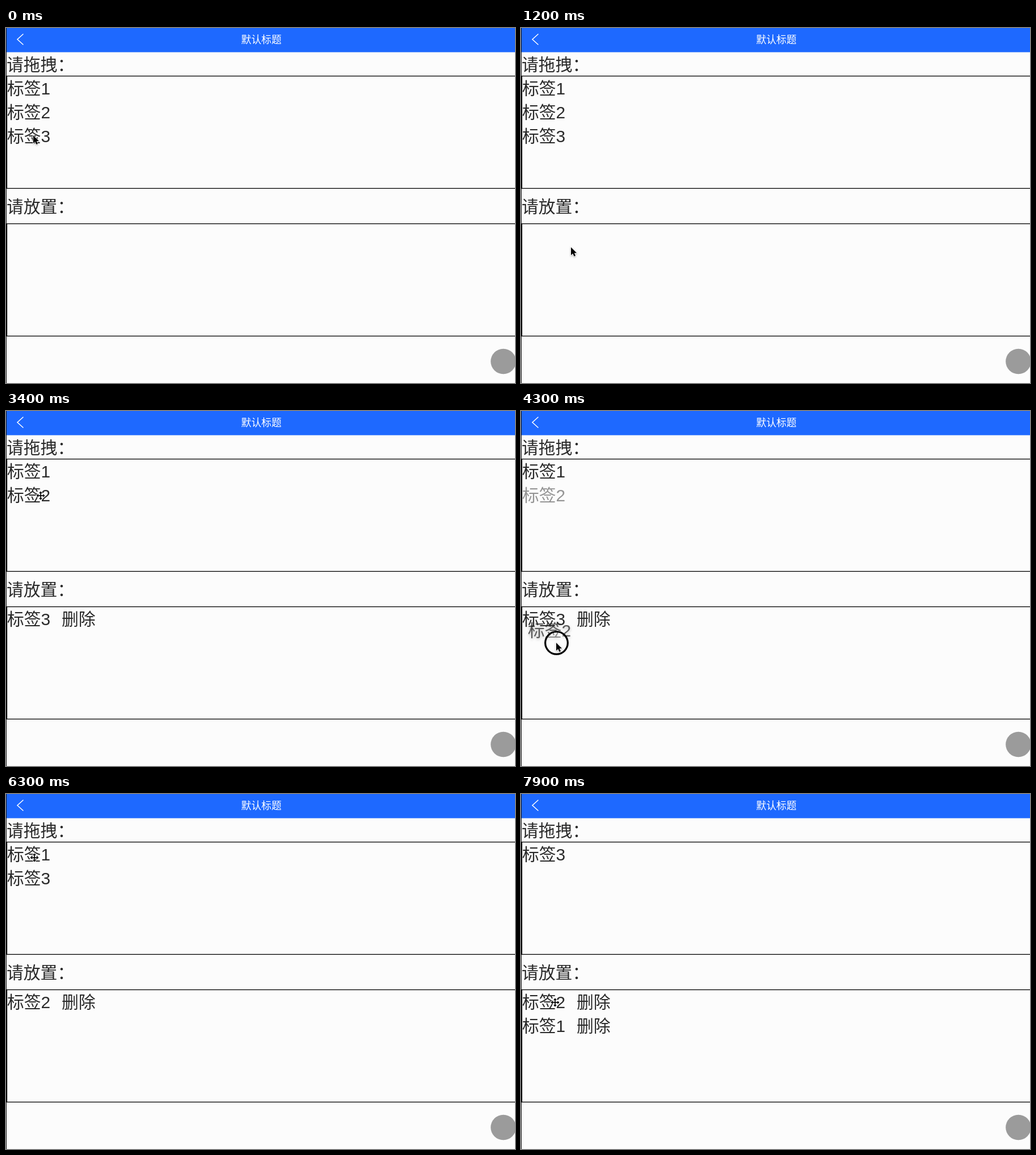
An HTML page with a canvas that plays this animation: 896x625 px, repeating every 8000 ms.

```html
<!DOCTYPE html>
<html lang="zh-CN">
<head>
<meta charset="utf-8">
<style>
html, body { margin: 0; width: 100%; height: 100%; overflow: hidden; background: #fcfcfc }
canvas { display: block }
</style>
</head>
<body>
<canvas id="stage" width="896" height="625"></canvas>
<script>
const c = document.getElementById('stage').getContext('2d');
const LOOP = 8000, STEP = 100, INK = '#2a2a2a';
const TAG = '标签';

// Pointer path: time, x, y, shape from that time on
const path = [
  [0, 48, 189, 'arrow'], [100, 49, 197, 'arrow'], [400, 66, 290, 'arrow'], [800, 85, 370, 'arrow'],
  [900, 86, 374, 'arrow'], [1000, 88, 386, 'arrow'], [1400, 88, 386, 'arrow'],
  [1900, 41, 199, 'cross'], [2100, 38, 196, 'cross'], [2200, 39, 196, 'cross'],
  [2300, 44, 226, 'arrow'], [2500, 65, 338, 'arrow'], [2800, 66, 416, 'arrow'],
  [3000, 66, 416, 'cross'], [3100, 65, 375, 'arrow'], [3400, 61, 149, 'cross'], [3800, 60, 148, 'cross'],
  [3900, 60, 165, 'arrow'], [4300, 62, 408, 'arrow'], [4500, 61, 403, 'cross'], [4700, 60, 397, 'cross'],
  [5000, 60, 397, 'cross'], [5300, 112, 368, 'text'], [5400, 118, 365, 'text'], [5700, 118, 365, 'text'],
  [5900, 116, 355, 'arrow'], [6300, 50, 112, 'cross'], [6600, 45, 109, 'cross'],
  [6700, 46, 140, 'arrow'], [6900, 53, 302, 'arrow'], [7200, 59, 425, 'arrow'],
  [7400, 60, 420, 'cross'], [7700, 60, 390, 'cross'], [7900, 60, 367, 'cross']
];

const presses = [[900, 1100], [2100, 2900], [3800, 4400], [5400, 5500], [6500, 7300]];

// Dragged tag, its row, and the offset from pointer to ghost text
const drags = [
  { from: 2300, to: 3000, tag: 3, row: 2, dx: -37, dy: -10 },
  { from: 3900, to: 4500, tag: 2, row: 1, dx: -50, dy: -11 },
  { from: 6700, to: 7400, tag: 1, row: 0, dx: -42.5, dy: -14.5 }
];

// List contents: start time, tags above, tags below
const states = [
  [0, [1, 2, 3], []], [3000, [1, 2], [3]], [4500, [1], [3, 2]],
  [5600, [1, 3], [2]], [7400, [3], [2, 1]]
];

const latest = (list, t) => list.filter(k => k[0] <= t).pop();

function pointerAt(t) {
  const a = latest(path, t), b = path[path.indexOf(a) + 1] || a;
  const u = a === b ? 0 : (t - a[0]) / (b[0] - a[0]);
  return { x: a[1] + (b[1] - a[1]) * u, y: a[2] + (b[2] - a[2]) * u, shape: a[3] };
}

function text(s, x, y, size = 29.8, color = INK) {
  c.font = `300 ${size}px "Liberation Sans", "Noto Sans CJK SC", "Noto Sans CJK", sans-serif`;
  c.fillStyle = color;
  c.fillText(s, x, y);
}

function line(points, color, width) {
  c.beginPath();
  points.forEach(p => c.lineTo(p[0], p[1]));
  c.strokeStyle = color;
  c.lineWidth = width;
  c.stroke();
}

function disc(x, y, r, fill) {
  c.beginPath();
  c.arc(x, y, r, 0, 7);
  c.fillStyle = fill;
  c.fill();
}

function drawPage() {
  c.fillStyle = '#fcfcfc';
  c.fillRect(0, 0, 896, 625);
  c.fillStyle = '#1e69ff';
  c.fillRect(0, 0, 896, 42.6);
  c.fillStyle = '#111';
  c.fillRect(0, 0, 1, 625);
  line([[30.5, 10.5], [20, 20], [30.5, 29.5]], '#fff', 1.5);
  c.textAlign = 'center';
  text('默认标题', 449.5, 27, 17.8, '#fff');
  c.textAlign = 'left';
  text('请拖拽：', 1, 74.5);
  text('请放置：', 1, 324.5);
  c.strokeStyle = '#000';
  c.lineWidth = 1.3;
  c.strokeRect(1.5, 84.6, 900, 197.8);
  c.strokeRect(1.5, 344.6, 900, 197.8);
  disc(875.5, 587, 22.3, '#9b9b9b');
}

const shapes = {
  arrow() {
    c.beginPath();
    [[0, 0], [0, 14], [3.2, 11], [5.5, 16], [8, 15], [5.8, 10.2], [10, 10]].forEach(p => c.lineTo(...p));
    c.closePath();
    c.save();
    c.shadowColor = 'rgba(0,0,0,.35)';
    c.shadowBlur = 3;
    c.shadowOffsetY = 1;
    c.strokeStyle = '#fff';
    c.lineWidth = 1.5;
    c.stroke();
    c.restore();
    c.fillStyle = '#000';
    c.fill();
  },
  cross() {
    for (const [color, w] of [['#fff', 3.6], ['#000', 1.7]]) {
      for (let i = 0; i < 4; i++) {
        line([[0, 0], [6, 0]], color, w);
        line([[4.3, -2], [6.3, 0], [4.3, 2]], color, w);
        c.rotate(Math.PI / 2);
      }
    }
  },
  text() {
    for (const [color, w] of [['#fff', 3], ['#000', 1.2]]) {
      line([[-3, -8], [0, -6.5], [3, -8]], color, w);
      line([[0, -6.5], [0, 6.5]], color, w);
      line([[-3, 8], [0, 6.5], [3, 8]], color, w);
      line([[-2, 3], [2, 3]], color, w);
    }
  }
};

function drawPointer(p, t) {
  const press = presses.find(k => t >= k[0] && t <= k[1]);
  if (press) {
    disc(p.x + .5, p.y + .3, t === press[1] ? 15 : 19.8, 'rgba(255,255,255,.3)');
    c.strokeStyle = '#000';
    c.lineWidth = 3.2;
    c.stroke();
  }
  c.save();
  c.translate(p.x, p.y);
  shapes[p.shape]();
  c.restore();
}

function draw(t) {
  const [, above, below] = latest(states, t);
  const drag = drags.find(d => t >= d.from && t < d.to);
  const p = pointerAt(t);
  drawPage();
  above.forEach((n, i) =>
    text(TAG + n, 2, 117 + 42 * i, undefined, drag && drag.row === i ? '#949494' : INK));
  below.forEach((n, i) => {
    text(TAG + n, 2, 377 + 42 * i);
    text('删除', 98, 377 + 42 * i);
  });
  if (drag && !below.length) text('请拖拽到此处', 2, 377);
  if (drag) {
    c.save();
    c.globalAlpha = .75;
    c.shadowColor = 'rgba(0,0,0,.35)';
    c.shadowBlur = 5;
    c.shadowOffsetY = 2;
    text(TAG + drag.tag, p.x + drag.dx, p.y + drag.dy);
    c.restore();
  }
  drawPointer(p, t);
}

const start = performance.now();
function tick() {
  const t = (performance.now() - start) % LOOP;
  draw(Math.floor(t / STEP) * STEP);
  requestAnimationFrame(tick);
}
tick();
</script>
</body>
</html>
```
